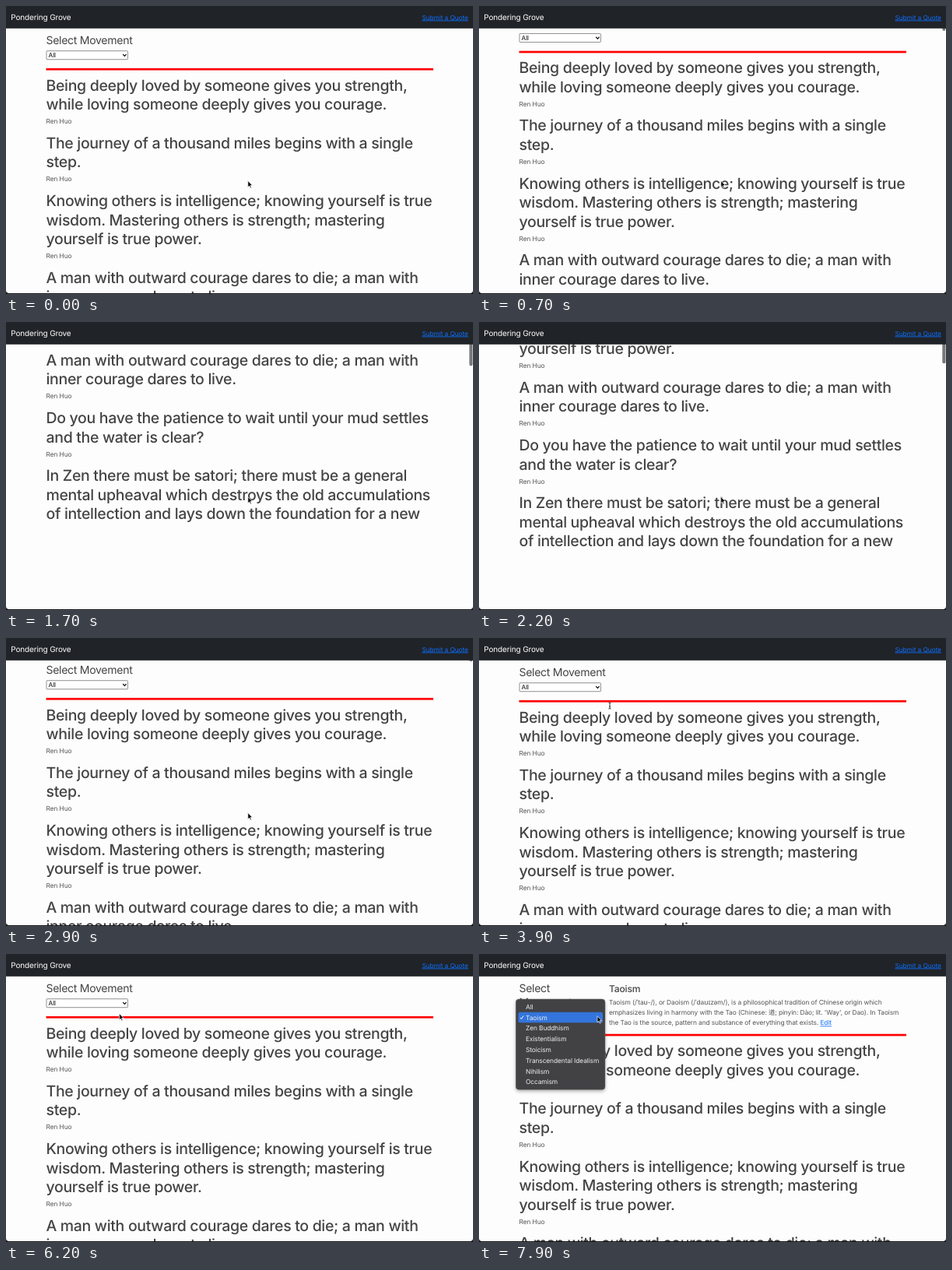
These frames come from a looping animation (600 by 370 pixels, 8000 ms). An HTML page:

```html
<!DOCTYPE html>
<html lang="en">
<head>
<meta charset="utf-8">
<title>Pondering Grove</title>
<style>
  html, body { margin: 0; width: 100%; height: 100%; overflow: hidden; background: #111; }
  svg { display: block; width: 600px; height: 370px; }
  text { font: 8.4px Inter, "Noto Sans CJK SC", sans-serif; font-optical-sizing: none; letter-spacing: -.1px; fill: #555; white-space: pre; text-rendering: geometricPrecision; }
  .quote { font-size: 19.5px; font-weight: 500; letter-spacing: -.33px; fill: #444; }
  .head { font-size: 14.1px; letter-spacing: -.32px; fill: #444; }
  .sub { font-size: 12.1px; font-weight: 500; letter-spacing: -.2px; fill: #444; }
  .brand { font-size: 10px; letter-spacing: -.15px; fill: #fff; }
  .link { fill: #0d6efd; text-decoration: underline; }
  .choice { fill: #111; }
  .item { fill: #eee; }
</style>
</head>
<body>
<svg viewBox="0 0 600 370">
  <defs>
    <clipPath id="window"><path d="M0 0H600V365Q600 369 596 369H4Q0 369 0 365Z"/></clipPath>
    <filter id="shadow" x="-20%" y="-20%" width="140%" height="140%">
      <feDropShadow dx="0" dy="2" stdDeviation="2" flood-opacity=".3"/>
    </filter>
  </defs>
  <rect width="600" height="370" fill="#111"/>
  <g clip-path="url(#window)">
    <rect width="600" height="370" fill="#fdfdfd"/>
    <g id="page">
      <g id="plainHead"><text class="head" x="51.5" y="49.3">Select Movement</text></g>
      <g id="topicHead">
        <text class="head" x="51.5" y="49.3">Select</text>
        <text class="head" x="51.5" y="67.3">Movement</text>
        <text class="sub" x="167" y="49.2">Taoism</text>
        <text x="167" y="65.2">Taoism (/ˈtaʊ-/), or Daoism (/ˈdaʊɪzəm/), is a philosophical tradition of Chinese origin which</text>
        <text x="167" y="78.3">emphasizes living in harmony with the Tao (Chinese: 道; pinyin: Dào; lit. 'Way', or Dao). In Taoism</text>
        <text x="167" y="91.4">the Tao is the source, pattern and substance of everything that exists. <tspan class="link">Edit</tspan></text>
      </g>
      <g id="select">
        <rect x="52" y="57.7" width="104.5" height="11" rx=".8" fill="#fff" stroke="#767676" stroke-width=".8"/>
        <text class="choice" id="choice" x="54.5" y="66.2"></text>
        <path d="M150.2 62l2.2 2.3 2.2-2.3" fill="none" stroke="#111" stroke-width="1.2"/>
      </g>
      <g id="body">
        <rect x="51.5" y="79.9" width="497.5" height="2.7" fill="#f00"/>
        <g id="quotes"></g>
      </g>
    </g>
    <rect id="thumb" x="595.3" width="4.2" height="30" rx="2.1" fill="#777"/>
    <rect width="600" height="28.8" fill="#202327"/>
    <text class="brand" x="6.3" y="17.8">Pondering Grove</text>
    <text class="link" x="534.4" y="17.5">Submit a Quote</text>
  </g>
  <g id="menu">
    <rect x="47.3" y="58" width="114.7" height="116.3" rx="4" fill="#424344" stroke="#666" stroke-width=".5" filter="url(#shadow)"/>
    <rect id="hover" x="50.5" y="61" width="108.5" height="13.4" rx="2.5" fill="#3375dc"/>
    <g id="items"></g>
    <path id="check" d="M53 67.9l1.4 1.8 2.6-4" fill="none" stroke="#fff" stroke-width="1"/>
  </g>
  <g id="cursor">
    <path id="arrow" d="M0 0V8.2L1.9 6.5 3.2 9.4 4.5 8.8 3.2 6H5.8Z" fill="#000" stroke="#fff" stroke-width=".7"/>
    <path id="beam" d="M-1.6-4Q0-4 0-3Q0-4 1.6-4M0-3V3M-1.6 4Q0 4 0 3Q0 4 1.6 4M-1 1H1" fill="none" stroke="#222" stroke-width=".9"/>
  </g>
</svg>
<script>
const $ = id => document.getElementById(id);
const LOOP = 8000, STEP = 100, LINE = 24.6, ROW = 13.8, TOPIC_SHIFT = 22.8;
const author = "Ren Huo";
const movements = ["All", "Taoism", "Zen Buddhism", "Existentialism", "Stoicism",
  "Transcendental Idealism", "Nihilism", "Occamism"];
const quotes = [
  ["Being deeply loved by someone gives you strength,", "while loving someone deeply gives you courage."],
  ["The journey of a thousand miles begins with a single", "step."],
  ["Knowing others is intelligence; knowing yourself is true", "wisdom. Mastering others is strength; mastering", "yourself is true power."],
  ["A man with outward courage dares to die; a man with", "inner courage dares to live."],
  ["Do you have the patience to wait until your mud settles", "and the water is clear?"],
  ["In Zen there must be satori; there must be a general", "mental upheaval which destroys the old accumulations", "of intellection and lays down the foundation for a new"]
];

// Each key is [time, ...values]; values ease from one key to the next.
const scrollKeys = [[500, 0], [800, 30], [900, 30], [1200, 171], [1700, 300], [2200, 265], [2700, 20], [2900, 3], [3100, 0]];
const cursorKeys = [[3300, 310.8, 224.6], [3900, 168, 87], [4600, 140, 62], [5000, 138, 63],
  [5700, 143, 75], [6200, 145.5, 76.5], [6700, 148, 82], [7200, 151, 80], [7900, 152, 79.7]];

function track(keys, t) {
  const next = keys.findIndex(k => k[0] > t);
  if (next < 0) return keys[keys.length - 1].slice(1);
  if (next === 0) return keys[0].slice(1);
  const a = keys[next - 1], b = keys[next];
  const u = (t - a[0]) / (b[0] - a[0]), e = u * u * (3 - 2 * u);
  return a.slice(1).map((v, i) => v + (b[i + 1] - v) * e);
}

const label = (cls, x, y, str) => `<text class="${cls}" x="${x}" y="${y}">${str}</text>`;
const show = (id, on) => $(id).style.display = on ? "" : "none";
const move = (id, x, y) => $(id).setAttribute("transform", `translate(${x} ${y})`);

let y = 108.5;
$("quotes").innerHTML = quotes.map((lines, i) => {
  let out = "";
  for (const line of lines) {
    out += label("quote", 51.5, y, line);
    y += LINE;
  }
  if (i < quotes.length - 1) out += label("", 51.5, y - 6.5, author);
  y += 25;
  return out;
}).join("");
$("items").innerHTML = movements.map((name, i) => label("item", 60, 70.7 + i * ROW, name)).join("");

function draw(t) {
  const [scroll] = track(scrollKeys, t);
  const topic = t >= 6300;
  move("page", 0, -scroll);
  show("plainHead", !topic);
  show("topicHead", topic);
  move("select", 0, topic ? 18 : 0);
  move("body", 0, topic ? TOPIC_SHIFT : 0);
  $("choice").textContent = movements[+topic];
  show("thumb", t >= 600 && t < 3600);
  $("thumb").setAttribute("y", scroll * .088);

  const hovered = t >= 5500 ? 1 : 0;
  show("menu", t >= 4900 && t < 6100 || t >= 7300);
  move("menu", 0, topic ? 0 : -4.7);
  move("hover", 0, hovered * ROW);
  move("check", 0, topic ? ROW : 0);

  const beam = t >= 3500 && t < 4000;
  show("beam", beam);
  show("arrow", !beam);
  move("cursor", ...track(cursorKeys, t));
}

function tick() {
  draw(Math.floor(performance.now() % LOOP / STEP) * STEP);
  requestAnimationFrame(tick);
}
tick();
</script>
</body>
</html>
```
